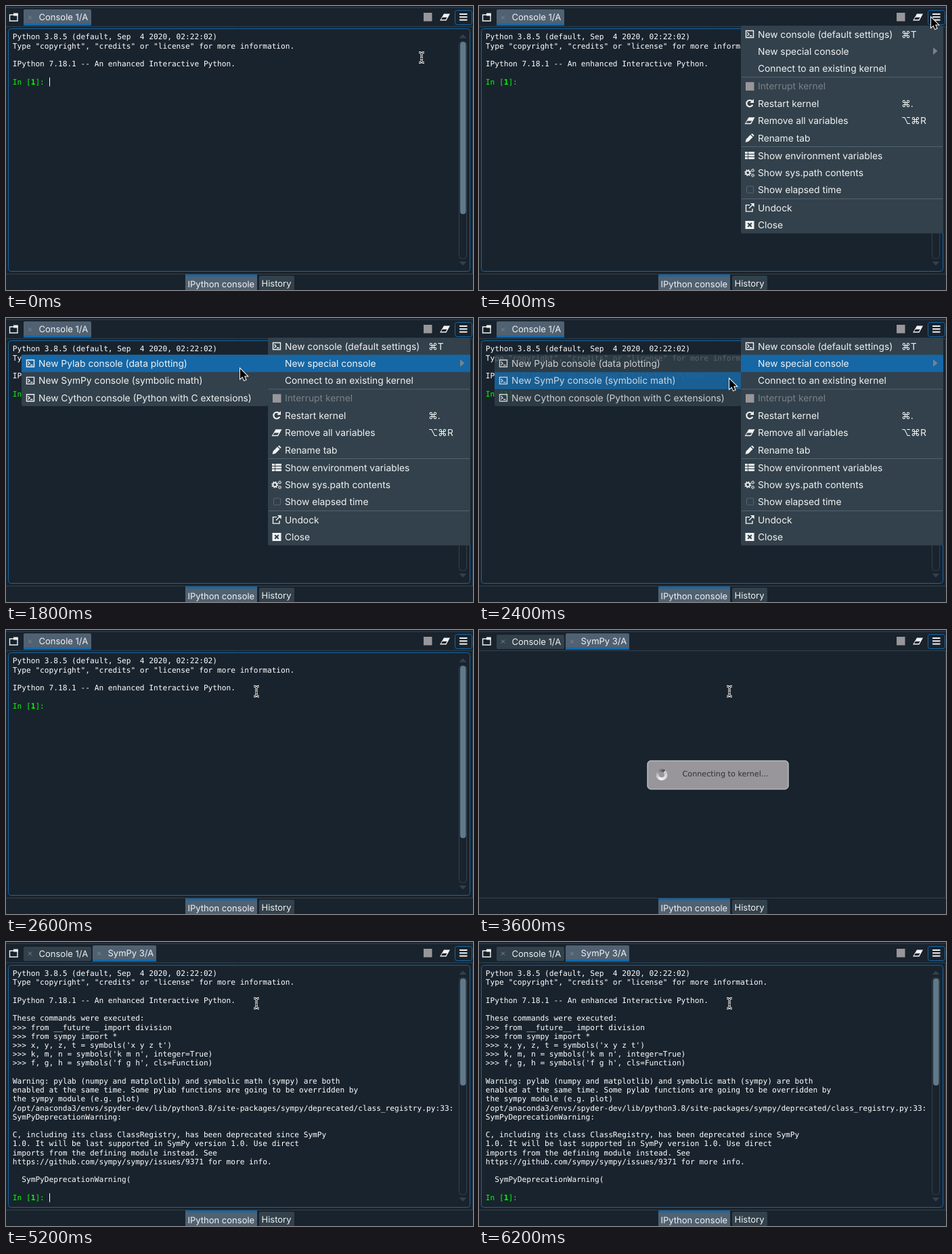
These frames come from a looping animation (690x419 px, 6400 ms). An HTML page with a canvas:

```html
<!DOCTYPE html>
<html lang="en">
<head>
<meta charset="utf-8">
<title>Console menu</title>
<style>
html, body { margin: 0; width: 100%; height: 100%; overflow: hidden; background: #19232d; }
canvas { display: block; }
</style>
</head>
<body>
<canvas id="stage" width="690" height="419"></canvas>
<script>
const ctx = document.getElementById('stage').getContext('2d');
ctx.textRendering = 'geometricPrecision';

const STEP = 200, LOOP = 6400;
const BG = '#19232d', PANEL = '#32414b', TAB = '#506172', BLUE = '#1567a6',
      WHITE = '#f2f2f2', GRAY = '#98969a', DIM = '#7b8188';
const UI = 'Inter, "DejaVu Sans", sans-serif';
const MONO = '"DejaVu Sans Mono", monospace';
const ROW = 25.4;

function box(x, y, w, h, color, r = 0) {
  ctx.fillStyle = color;
  ctx.beginPath();
  ctx.roundRect(x, y, w, h, r);
  ctx.fill();
}

function frame(x, y, w, h, color, r = 0) {
  ctx.strokeStyle = color;
  ctx.lineWidth = 1;
  ctx.beginPath();
  ctx.roundRect(x, y, w, h, r);
  ctx.stroke();
}

function text(s, x, y, size = 13, color = WHITE, family = UI) {
  ctx.font = size + 'px ' + family;
  ctx.fillStyle = color;
  ctx.fillText(s, x, y);
}

function shape(path, x, y, { fill, stroke, width = 1.5 }) {
  const p = new Path2D(path);
  ctx.save();
  ctx.translate(x, y);
  if (stroke) {
    ctx.strokeStyle = stroke;
    ctx.lineWidth = width;
    ctx.stroke(p);
  }
  if (fill) {
    ctx.fillStyle = fill;
    ctx.fill(p, 'evenodd');
  }
  ctx.restore();
}

// Icons: line part, solid part, dark overlay lines
const ICONS = {
  terminal: ['M-5.5-5H5.5V5H-5.5ZM-3.5-2.5L-1 0-3.5 2.5M0 2.5H3.5'],
  restart: ['M4-2.6A4.7 4.7 0 1 0 4.3 2', 'M6-6.5V-.8H.3Z'],
  eraser: ['', 'M-1.5-5H7.5L2 5H-7.5ZM-3.5 .3L-5.7 3.6H1.2L3.2 .3Z'],
  pencil: ['', 'M-6.5 6.5L-5.3 2 1-4.5 4.5-1-2 5.3ZM2-5.4L3.6-6.6 6.6-3.6 5.4-2Z'],
  list: ['', [-5.5, -1.5, 2.5].map(y => `M-7 ${y}h4v3h-4ZM-2 ${y}h9v3h-9Z`).join('')],
  undock: ['M0-4H-5.5V5.5H4V1.5M-1 1L5-5', 'M1-6.5H6.7V-.8Z'],
  close: ['', 'M-6.5-6H6.5V6H-6.5Z', 'M-2.8-2.8L2.8 2.8M2.8-2.8L-2.8 2.8'],
  pane: ['M-6-3.5H5.5V5.5H-6Z', 'M-.5-6H6.3V-2H-.5Z']
};

function cog(x, y, r) {
  ctx.strokeStyle = WHITE;
  ctx.lineWidth = r * .6;
  for (const [k, dash] of [[1, []], [1.5, [r * .59, r * .59]]]) {
    ctx.setLineDash(dash);
    ctx.beginPath();
    ctx.arc(x, y, r * k, 0, 7);
    ctx.stroke();
  }
  ctx.setLineDash([]);
}

function icon(name, x, y) {
  if (name === 'stop') box(x - 6, y - 6, 12.5, 12.5, GRAY);
  else if (name === 'check') frame(x - 4.5, y - 5.5, 10, 10, '#56656f', 1);
  else if (name === 'cogs') {
    cog(x - 2.8, y, 2.8);
    cog(x + 4.5, y - 3.5, 1.5);
    cog(x + 4.5, y + 3.8, 1.5);
  } else if (name) {
    const [line, solid, dark] = ICONS[name];
    shape(line, x, y, { stroke: WHITE, width: name === 'restart' ? 2.1 : 1.4 });
    if (solid) shape(solid, x, y, { fill: WHITE });
    if (dark) shape(dark, x, y, { stroke: PANEL, width: 2 });
  }
}

const MENU = [
  [41.5, 'terminal', 'New console (default settings)', '⌘T'],
  [67, '', 'New special console'],
  [92.3, '', 'Connect to an existing kernel'],
  [118.3, 'stop', 'Interrupt kernel'],
  [143.8, 'restart', 'Restart kernel', '⌘.'],
  [169.2, 'eraser', 'Remove all variables', '⌥⌘R'],
  [194.6, 'pencil', 'Rename tab'],
  [220.6, 'list', 'Show environment variables'],
  [246, 'cogs', 'Show sys.path contents'],
  [271.4, 'check', 'Show elapsed time'],
  [297.6, 'undock', 'Undock'],
  [323, 'close', 'Close']
];
const SUBMENU = [
  'New Pylab console (data plotting)',
  'New SymPy console (symbolic math)',
  'New Cython console (Python with C extensions)'
];

const BANNER = `Python 3.8.5 (default, Sep  4 2020, 02:22:02)
Type "copyright", "credits" or "license" for more information.

IPython 7.18.1 -- An enhanced Interactive Python.
`;
const SYMPY = BANNER + `
These commands were executed:
>>> from __future__ import division
>>> from sympy import *
>>> x, y, z, t = symbols('x y z t')
>>> k, m, n = symbols('k m n', integer=True)
>>> f, g, h = symbols('f g h', cls=Function)

Warning: pylab (numpy and matplotlib) and symbolic math (sympy) are both
enabled at the same time. Some pylab functions are going to be overridden by
the sympy module (e.g. plot)
/opt/anaconda3/envs/spyder-dev/lib/python3.8/site-packages/sympy/deprecated/class_registry.py:33:
SymPyDeprecationWarning:

C, including its class ClassRegistry, has been deprecated since SymPy
1.0. It will be last supported in SymPy version 1.0. Use direct
imports from the defining module instead. See
https://github.com/sympy/sympy/issues/9371 for more info.

  SymPyDeprecationWarning(
`;

function tab(label, x, w, active, dy) {
  box(x, active ? 5 : 7, w, active ? 24 : 21, active ? TAB : PANEL, 2);
  if (active) box(x, 26, w, 3, BLUE);
  shape('M-2.5-2.5L2.5 2.5M2.5-2.5L-2.5 2.5', x + 9.5, 17, { stroke: '#7c8b97', width: 1 });
  text(label, x + 22.5, 20.5 + dy);
}

function chrome(twoTabs) {
  box(0, 0, 690, 419, BG);
  box(0, 2, 690, 1, PANEL);
  icon('pane', 11.5, 16.5);
  tab('Console 1/A', 26, 100, !twoTabs, twoTabs ? 1.5 : 0);
  if (twoTabs) tab('SymPy 3/A', 128, 94, true, .5);
  icon('stop', 623, 16);
  icon('eraser', 648.5, 16.5);
  frame(663.5, 6.5, 25, 21, BLUE, 3);
  for (const y of [11, 15.3, 19.6]) box(670, y, 11.5, 2, WHITE);
  frame(-.5, 30.5, 690, 365, PANEL);

  box(265, 396, 106, 23, TAB);
  box(265, 396, 106, 3, BLUE);
  text('IPython console', 268.5, 415.3);
  box(374, 398, 52, 21, PANEL, 2);
  text('History', 377.5, 413.5);
}

function consoleView(content, dy, thumb, caret) {
  frame(3.5, 33.5 + dy, 682, 358 - dy, BLUE, 4);
  frame(669.5, 52.5, 11, 320, PANEL, 4);
  box(671, 53 + dy, 8.5, thumb, '#60798b', 4);
  shape('M-5.5 3L0-3 5.5 3Z', 675, 44.5 + dy, { fill: PANEL });
  shape('M-5.5-3L0 3 5.5-3Z', 675, 380, { fill: PANEL });

  const lines = content.split('\n');
  const base = i => 49.4 + dy + i * 13.22;
  lines.forEach((s, i) => text(s, 9.8, base(i), 11.16, '#fff', MONO));
  const y = base(lines.length);
  text('In [ ]:', 9.8, y, 11.16, '#0f0', MONO);
  ctx.font = 'bold 11.16px ' + MONO;
  ctx.fillText('1', 9.8 + 4 * 6.72, y);
  if (caret) box(64, y - 10, 1, 13, '#fff');
}

function mainMenu(hover) {
  box(387, 29, 299, 306.5, PANEL, 2);
  if (hover >= 0) box(387, MENU[hover][0] - 12.7, 299, ROW, BLUE);
  for (const y of [105, 207.5, 284.5]) box(388, y - .5, 297, 1, '#54646f');
  for (const [y, ico, label, keys] of MENU) {
    icon(ico, 400, y);
    text(label, 412, y + 5, 13.8, ico === 'stop' ? DIM : WHITE);
    if (keys) text(keys, 624, y + 5, 13.8);
  }
  shape('M-3-5.5L3.5 0-3 5.5Z', 674, 66.5, { fill: DIM });
}

function subMenu(hover, alpha) {
  ctx.globalAlpha = alpha;
  box(23, 54, 364, 76, PANEL, 2);
  if (hover >= 0) box(23, 54.3 + hover * ROW, 364, ROW, BLUE);
  SUBMENU.forEach((label, i) => {
    const y = 67 + i * ROW;
    icon('terminal', 36, y);
    text(label, 48, y + 5, 13.8);
  });
  ctx.globalAlpha = 1;
}

function connecting(step) {
  box(248.5, 192.5, 209, 42.5, '#99969b', 5);
  frame(249, 193, 208, 42, '#c3d0d3', 5);
  const ring = ctx.createConicGradient(-.9 + (step - 18) * 1.3, 270, 213.5);
  ring.addColorStop(0, '#f4f4f4');
  ring.addColorStop(.02, '#c4c4c4');
  ring.addColorStop(.45, '#f4f4f4');
  ring.addColorStop(1, '#4c4c50');
  ctx.strokeStyle = ring;
  ctx.lineWidth = 4.5;
  ctx.beginPath();
  ctx.arc(270, 213.5, 6.2, 0, 7);
  ctx.stroke();
  text('Connecting to kernel...', 300.5, 216, 11.2, '#2d3136', '"DejaVu Sans", sans-serif');
}

function arrow(x, y) {
  shape('M0 0V14.5L3.4 11.4 5.8 17 8.4 15.9 6 10.5H10.6Z', x, y,
    { fill: '#000', stroke: '#fff', width: 2 });
}

function beam(x, y) {
  const p = 'M-4-7.5Q0-7.5 0-5Q0-7.5 4-7.5M0-5V5M-4 7.5Q0 7.5 0 5Q0 7.5 4 7.5M-2 1.5H2';
  shape(p, x, y, { stroke: '#fff', width: 3 });
  shape(p, x, y, { stroke: '#111', width: 1 });
}

// Pointer place at each step while the menu is in use
const PATH = [[614, 76], [667, 20], [668, 17], [655, 40], [640, 64], [520, 71], [387, 82],
  [366, 72], [342, 68], [346, 75], [356, 84], [366, 89], [370, 90]];

function draw(step) {
  const twoTabs = step >= 15, ready = step >= 23;
  const menuOpen = step >= 2 && step <= 12;
  const caret = step % 2 === 0 && !menuOpen;
  const [x, y] = PATH[Math.min(step, PATH.length - 1)];

  chrome(twoTabs);
  if (!twoTabs) consoleView(BANNER, 0, 254, caret);
  else if (ready) consoleView(SYMPY, .8, 158, caret);
  else connecting(step);

  if (menuOpen) {
    const inSub = x < 387;
    mainMenu(inSub ? 1 : Math.floor((y - 29) / ROW));
    if (step >= 4) subMenu(inSub ? Math.floor((y - 54) / ROW) : -1, step === 12 ? .82 : 1);
  }
  if (step >= 1 && step <= 12) arrow(x, y);
  else beam(x, y + (step ? .5 : 0));
}

function tick() {
  draw(Math.floor(performance.now() % LOOP / STEP));
  requestAnimationFrame(tick);
}
tick();
</script>
</body>
</html>
```
